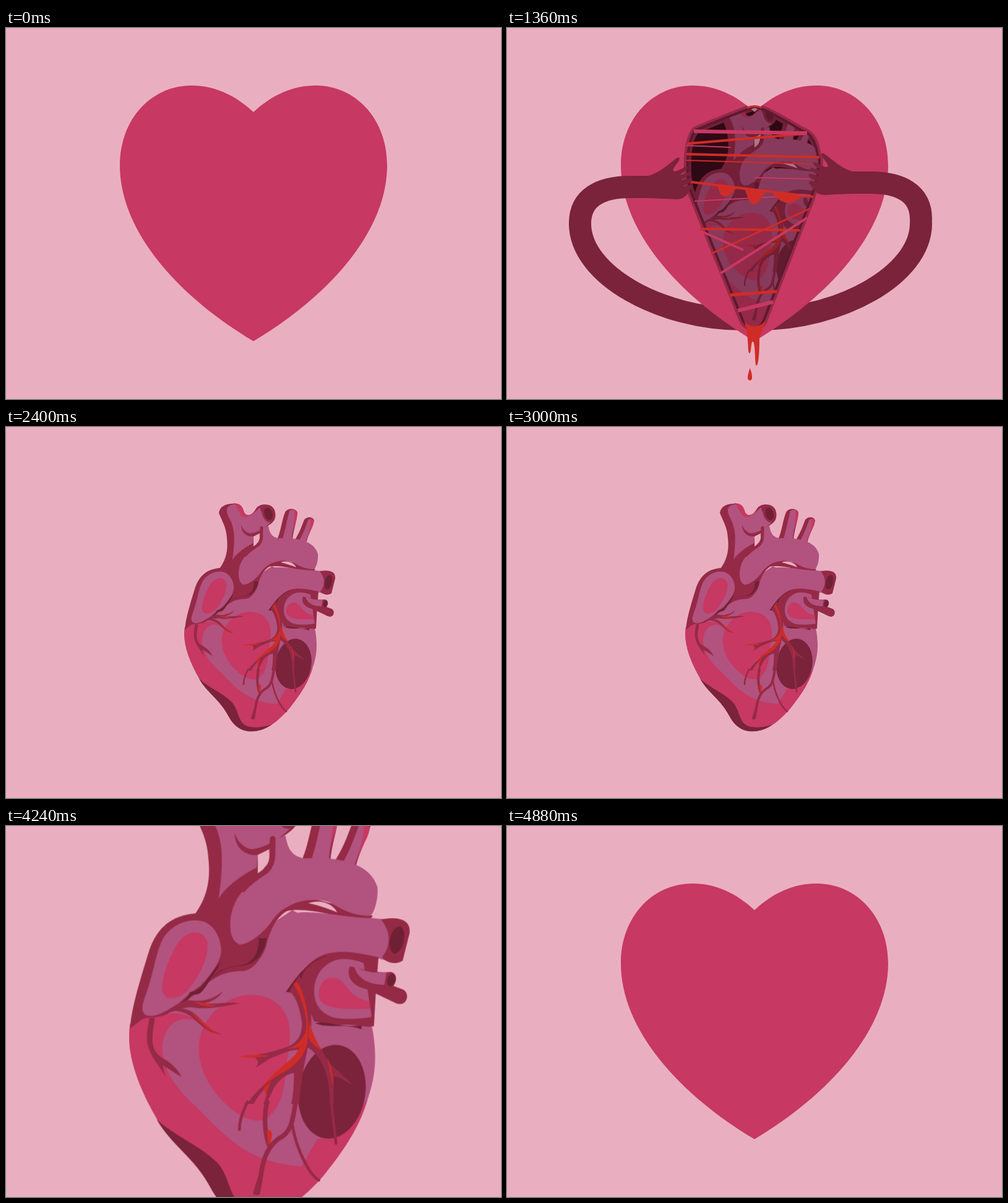
An HTML page for the animation above (4920 ms loop, 800 by 600 pixels).

```html
<!DOCTYPE html>
<html lang="en">
<head>
<meta charset="utf-8">
<title>Heart</title>
<style>
  html, body { margin: 0; width: 100%; height: 100%; overflow: hidden; background: #e9afc0; }
  svg { display: block; width: 800px; height: 600px; }
  .pale { fill: #e9afc0; }
  .crimson { fill: #c73862; }
  .mauve { fill: #b2527e; }
  .rose { fill: #952a47; }
  .maroon { fill: #7a233b; }
  .deep { fill: #6f2034; }
  .red { fill: #d02c27; }
  .limb { fill: none; stroke: #7a233b; stroke-width: 36; stroke-linecap: round; }
  .reach { stroke-dasharray: 1 3; }
  .vein { fill: none; stroke: #952a47; stroke-linecap: round; }
  .rim { fill: none; vector-effect: non-scaling-stroke; }
  .strands line { stroke-width: 4; }
  .tear, .grow { transform-origin: 400px 300px; }
  .hand { transform-origin: 238px 257px; }
  .blood { transform-origin: 400px 474px; }
  .zoom { transform-origin: 392px 328.7px; }
  .beat { transform-origin: 400px 287px; }
</style>
</head>
<body>
<svg viewBox="0 0 800 600">
  <defs>
    <path id="heart" d="M400 136C370 108 336 93 300 93C234 93 184 148 184 222C184 330 280 435 400 506.5C520 435 616 330 616 222C616 148 566 93 500 93C464 93 430 108 400 136Z"/>
    <clipPath id="inHeart"><use href="#heart"/></clipPath>
    <clipPath id="inTear"><path class="tear gap"/></clipPath>
  </defs>

  <g class="shell">
    <g class="armBack">
      <path class="limb reach lower" pathLength="1"/>
    </g>
    <use href="#heart" class="crimson"/>
    <g clip-path="url(#inHeart)">
      <g class="hollow"><path class="tear gap"/></g>
      <g class="fade"><path class="tear gap rim" stroke="#942a48" stroke-width="12"/></g>
    </g>
  </g>

  <g clip-path="url(#inTear)">
    <g class="zoom"><g class="beat">
      <!-- upper vessels -->
      <path class="rose" d="M344 139C345 129 355 124 366 124C376 122 382 128 384 138C390 146 398 143 404 132C408 126 416 124 424 126C434 128 438 140 434 150C428 160 416 162 411 170L404 200L380 250L340 235C352 222 360 205 357 180C356 162 349 152 344 139Z"/>
      <path class="mauve" d="M357 133C358 128 366 124 372 125C378 126 380 136 386 142C394 145 404 137 410 130C414 142 420 150 428 154C420 163 404 172 394 172C386 170 382 164 380 158C380 172 390 178 400 177L399 188C385 195 372 205 366 215C368 200 371 175 366 160C364 150 356 143 357 133Z"/>
      <path class="crimson" d="M370 125C378 122 383 130 385 138C390 146 396 143 400 138C394 148 384 147 379 141Z"/>
      <ellipse class="rose" cx="424" cy="140" rx="10" ry="14.500" transform="rotate(-18 424 140)"/>
      <ellipse class="deep" cx="424" cy="140.500" rx="6.500" ry="10.500" transform="rotate(-18 424 140)"/>
      <path class="rose" d="M439 180C445 165 446 150 451 138C455 130 470 131 471 139C470 152 464 168 463 183Z"/>
      <path class="mauve" d="M447 180C452 165 454 150 458 136C462 132 470 133 470 140C468 155 462 168 462 181Z"/>
      <path class="crimson" d="M466 135C472 135 471 142 469 151L463 170C465 155 467 147 466 135Z"/>
      <path class="rose" d="M466 184C475 170 478 160 482 150C487 144 497 145 498 152C495 164 487 176 485 189Z"/>
      <path class="mauve" d="M473 185C480 174 484 162 488 151C492 147 497 148 497 154C494 166 487 175 484 187Z"/>
      <path class="crimson" d="M492 149C499 149 498 156 494 164L486 180C490 168 493 160 492 149Z"/>

      <!-- body -->
      <path class="mauve" d="M289 324C285 348 295 377 313 408C325 430 345 440 360 468C370 488 385 492 400 492C425 490 445 470 458 455C478 430 490 410 496 388C504 365 503 345 499 325L500 262L430 225L385 255L340 280L310 314Z"/>
      <path class="crimson" d="M289 324C298 318 320 314 331 315C342 316 348 322 353 326C347 320 338 318 331 321C322 324 316 336 317 348C318 365 330 381 343 393C365 413 385 445 438 448L452 424C470 425 485 405 495 390C490 410 478 430 458 455C445 470 425 490 400 492C385 492 370 488 360 468C345 440 325 430 313 408C295 377 285 348 289 324Z"/>
      <g transform="translate(297.8 249.500) scale(.2404)">
        <path class="crimson" d="M400 205C490 205 541 265 541 345C541 400 530 440 525 480C525 560 490 665 420 660C375 655 340 630 310 600C250 545 212 470 212 400C212 290 310 205 400 205Z"/>
      </g>
      <ellipse class="maroon" cx="464.500" cy="383" rx="29" ry="41" transform="rotate(9 464 383)"/>
      <path class="maroon" d="M312 407C325 420 350 430 365 445C378 460 374 482 395 485C410 487 420 484 430 481C415 492 400 493 390 492C375 490 365 478 358 465C345 440 325 430 312 407Z"/>

      <!-- pulmonary trunk and aorta -->
      <path class="rose" d="M340 237L405 192L420 215C445 210 470 222 500 230L495 237C470 230 440 222 425 226C410 236 411 250 405 262C398 275 392 277 388 278C375 278 367 281 360 286L340 300Z"/>
      <path class="mauve" d="M407 262C408 245 415 232 430 228C450 224 475 232 500 232L518 234L512 269C490 262 460 262 446 276L425 296L395 280Z"/>
      <path class="mauve" d="M376 238C376 215 392 200 410 190C417 182 411 170 416 163L424 160C426 172 430 178 440 180C470 178 498 184 504 205C505 216 501 228 498 230C480 230 470 222 462 218C440 212 420 222 412 235C404 246 392 255 384 255C378 252 376 246 376 238Z"/>
      <path class="vein" stroke-width="5" d="M413 163C412 175 415 183 407 191C398 197 392 201 387 207"/>
      <path class="pale" d="M400 177L410 172C409 184 408 188 400 193ZM444 219C455 215 466 220 469 227C462 224 453 221 444 219Z"/>
      <path class="rose" d="M507 233C526 230 533 235 532 245L526 269C520 273 512 271 508 266C516 256 516 244 507 233Z"/>
      <ellipse class="deep" cx="521" cy="251" rx="6" ry="12" transform="rotate(12 521 251)"/>

      <!-- left auricle -->
      <path class="rose" d="M289 328C290 310 298 285 305 262C312 240 325 230 345 228C365 230 376 262 367 274L352 292C345 300 335 305 325 313C315 321 305 316 298 321Z"/>
      <path class="mauve" d="M318 249C325 238 340 231 353 235C364 239 369 253 368 262C366 275 356 284 350 291C342 296 336 302 330 307C320 313 310 320 302 316C296 311 303 300 306 288C310 275 312 260 318 249Z"/>
      <path class="crimson" d="M317 294C316 285 324 262 332 252C340 242 352 242 356 252C358 265 350 282 338 296C330 303 318 305 317 294Z"/>

      <!-- right auricle -->
      <path class="rose" d="M425 296C436 285 442 268 460 263C475 259 490 263 505 266L503 290L501 326C490 328 480 322 468 326C460 326 455 322 449 322L440 300Z"/>
      <path class="mauve" d="M449 296C449 278 462 267 476 267.500C485 268 488 270 492 271L499 318C488 320 478 320 468 319C456 316 449 308 449 296Z"/>
      <path class="crimson" d="M453 298C453 288 460 283 466 284C478 285 478 303 497 304L498 311C480 311 453 313 453 298Z"/>
      <path class="rose" d="M480 274C476 285 485 292 495 294L520 306C530 310 533 297 526 294L518 291C523 284 519 278 514 279C502 280 490 276 480 274Z"/>
      <path class="mauve" d="M484 274C498 281 504 279 512 279L510 290C500 290 487 287 484 274Z"/>
      <ellipse class="deep" cx="516" cy="286" rx="3.500" ry="5.500" transform="rotate(15 516 286)"/>

      <!-- lower vessels -->
      <path class="vein" stroke-width="2.500" d="M391 392C386 402 384 410 384 416M464 393L468 428M430 412C434 435 445 455 453 460"/>
      <path class="vein" stroke-width="4" d="M408 392C404 410 408 425 410 430M433 392C430 408 430 418 418 424C402 436 404 455 400 471M402 458L398 471"/>
      <path class="red" d="M408 417C413 414 414 424 409 430Z"/>

      <g transform="translate(297.8 249.500) scale(.2404)">
        <path class="deep" d="M258 150C290 100 340 105 384 93C420 70 430 40 428 0L457 0C450 50 425 85 384 97C340 104 300 100 258 150Z"/>
        <path class="deep" d="M90 270C150 240 165 225 180 195C230 190 240 140 290 85L280 110C250 150 235 185 215 200C190 210 185 200 175 220C150 240 130 265 90 270Z"/>
        <path class="deep" d="M526 195C560 150 600 80 680 62C620 85 590 110 585 140L548 195ZM632 308C680 295 710 325 800 316L800 330C740 305 690 330 632 308Z"/>
        <path class="rose" d="M90 270C140 245 160 220 180 225C220 230 260 225 298 192C280 225 240 234 232 236C280 240 320 228 358 236C310 245 240 260 190 250C160 246 125 268 90 270Z"/>
        <path class="rose" d="M125 262C160 245 190 265 210 285C235 310 255 335 292 347C250 345 225 320 200 298C180 275 150 265 125 262Z"/>
        <path class="rose" d="M32 288L53 288C45 340 30 400 75 430C110 450 135 470 150 503C120 485 100 470 80 460L92 503C70 460 25 420 24 360C24 330 32 310 32 288Z"/>
        <path class="rose" d="M540 190L575 135C615 210 625 280 615 350C600 430 585 480 575 600L546 600C556 560 555 520 556 488C530 488 490 520 475 560L455 600L387 600C420 550 450 530 470 515C520 480 560 450 575 405C540 400 500 425 470 435L415 470C430 455 430 445 415 432L365 428C430 425 480 410 520 398C560 385 585 360 585 310C580 260 565 215 540 190Z"/>
        <path class="crimson" d="M450 545C430 565 415 590 410 600L445 600C460 570 458 550 450 545Z"/>
        <path class="rose" d="M612 320C620 370 650 390 665 420C690 470 735 490 770 533C740 515 715 500 702 500C698 540 700 580 700 600L685 600C687 540 675 480 650 440C635 415 615 400 600 392Z"/>
        <path class="red" d="M555 165C560 155 570 160 575 170C605 230 612 310 605 370C600 430 550 470 500 495C480 505 465 520 440 540C480 480 560 440 577 395L520 403C560 395 590 370 600 330C605 270 580 210 555 165Z"/>
        <path class="red" d="M360 429C390 420 430 420 468 425C440 432 390 432 360 429ZM612 300C620 340 640 380 658 405C640 400 620 380 608 360ZM676 430C690 460 700 500 696 535C690 500 685 470 676 430ZM445 542L472 520C465 540 455 555 458 572Z"/>
        <path class="red" d="M195 230C220 232 250 240 276 244C250 252 220 245 195 230ZM183 266C210 285 240 320 284 346C250 340 210 300 183 266Z"/>
      </g>
    </g></g>
    <rect class="shade" width="800" height="600" fill="#2e0a16"/>
  </g>

  <g class="fade">
    <path class="tear gap rim" stroke="#5e1830" stroke-width="4"/>
    <g class="strands tear" stroke="#d02c27">
      <line x1="292" y1="187" x2="480" y2="171"/>
      <line x1="290" y1="204" x2="505" y2="209"/>
      <line x1="290" y1="214" x2="495" y2="220" style="stroke-width:2"/>
      <line x1="297" y1="249" x2="495" y2="273"/>
      <line x1="312" y1="325" x2="473" y2="327"/>
      <line x1="330" y1="365" x2="490" y2="292" style="stroke-width:3"/>
      <line x1="360" y1="432" x2="436" y2="426" style="stroke-width:5"/>
      <path d="M388 129Q400 124 412 129" fill="none" stroke-width="3"/>
      <g stroke="#c73862">
        <line x1="302" y1="167" x2="485" y2="170" style="stroke-width:6"/>
        <line x1="290" y1="190" x2="362" y2="193" style="stroke-width:2"/>
        <line x1="400" y1="242" x2="490" y2="244" style="stroke-width:2"/>
        <line x1="303" y1="280" x2="490" y2="270" style="stroke-width:2"/>
        <line x1="312" y1="328" x2="382" y2="359"/>
        <line x1="345" y1="397" x2="485" y2="307"/>
        <line x1="373" y1="457" x2="430" y2="443" style="stroke-width:6"/>
      </g>
      <path class="red" stroke="none" d="M335 253C345 254 340 272 352 272C366 272 362 262 372 260L385 262C388 270 392 285 400 285C410 284 410 272 418 266L430 267C435 275 445 283 455 283C465 282 470 276 480 272Z"/>
    </g>
    <path class="blood red" d="M383 472C390 486 408 486 419 472C414 490 408 495 408 505C408 520 407 546 403 546C400 546 402 507 397 507C394 508 395 526 392 526C388 526 392 500 383 472Z"/>
  </g>
  <path class="drop red" d="M392.500 550C396 558 396 562 396 566C396 571 389 571 389 566C389 562 390 558 392.500 550Z"/>

  <g class="armFront">
    <path class="limb upper"/>
    <path class="hand maroon" d="M225 240C245 236 258 222 272 212C278 207 281 210 277 216C271 224 266 230 270 232C276 232 284 226 290 224C293 224 293 227 290 229L279 238L295 233C298 233 298 237 295 238L281 246L297 243C300 244 300 248 297 249L284 256L297 254C300 256 299 259 296 261C292 270 285 278 272 277C255 276 240 275 225 275Z"/>
  </g>

  <use href="#heart" class="grow pale outer"/>
  <use href="#heart" class="grow crimson inner"/>
</svg>
<script>
  const LOOP = 4920;
  const sheet = document.createElement('style');
  let count = 0;

  // Turns [ms, value] pairs into a looping keyframe rule.
  function animate(selector, property, frames) {
    const name = 'k' + count++;
    const all = [[0, frames[0][1]], ...frames, [LOOP, frames.at(-1)[1]]];
    const body = all.map(([ms, v]) => `${(ms / LOOP * 100).toFixed(4)}%{${property}:${v}}`).join('');
    sheet.textContent += `@keyframes ${name}{${body}}${selector}{animation:${name} ${LOOP}ms linear infinite}`;
  }

  const gap = 'M400 127C380 135 340 150 305 165C288 185 290 240 296 262L380 470C388 490 410 490 416 470L490 280C500 250 510 215 502 205C498 180 490 170 475 165C450 150 420 132 400 127Z';
  document.querySelectorAll('.gap').forEach(p => p.setAttribute('d', gap));

  // The right arm mirrors the left one.
  for (const [name, dy] of [['armBack', 0], ['armFront', -7]]) {
    const arm = document.querySelector('.' + name);
    const twin = arm.cloneNode(true);
    twin.setAttribute('transform', `translate(787 ${dy}) scale(-1 1)`);
    arm.after(twin);
  }

  const lower = x => `path("M380 471C250 471 ${x} 400 ${x} 316")`;
  const upper = (x, wrist) => `path("M${x} 316C${x} 275 ${x + 32} 257 ${wrist - 40} 257L${wrist} 257")`;
  const folded = x => `path("M${x} 316C${x} 316 ${x} 316 ${x} 316L${x} 316")`;
  const hand = (x, y, s) => `translate(${x}px,${y}px) scale(${s})`;
  const heart = (y, s) => `translate(0,${y}px) scale(${s})`;

  animate('.lower', 'd', [[480, lower(72)], [600, lower(72)], [840, lower(110)], [880, lower(110)],
    [1360, lower(118)], [1440, lower(118)], [1560, lower(77)]]);
  animate('.armBack', 'stroke-dashoffset', [[320, 1], [480, 0], [1640, 0], [1760, 1]]);
  animate('.upper', 'd', [[480, folded(72)], [640, upper(72, 190)], [840, upper(110, 343)], [880, upper(110, 343)],
    [1120, upper(114, 270)], [1360, upper(118, 240)], [1440, upper(118, 240)], [1560, upper(77, 180)], [1660, folded(77)]]);
  animate('.hand', 'transform', [[480, hand(-166, 59, 0)], [640, hand(-48, 0, 1)], [840, hand(105, 0, 1)], [880, hand(105, 0, 1)],
    [1120, hand(32, 0, 1)], [1360, hand(0, 0, 1)], [1440, hand(0, 0, 1)], [1560, hand(-58, 0, 1)], [1660, hand(-161, 59, 0)]]);
  animate('.armFront', 'visibility', [[479, 'hidden'], [480, 'visible'], [1659, 'visible'], [1660, 'hidden']]);
  animate('.shell', 'visibility', [[1759, 'visible'], [1760, 'hidden'], [4919, 'hidden']]);

  // Once the shell is gone the opening outgrows the stage.
  animate('.tear', 'transform', [[880, 'scale(0,1)'], [1120, 'scale(.7,1)'], [1360, 'scale(1,1)'], [1440, 'scale(1,1)'],
    [1600, 'scale(3.2,1.5)'], [1601, 'scale(40,40)'], [4650, 'scale(40,40)'], [4651, 'scale(0,1)']]);
  animate('.hollow', 'fill', [[1440, '#2e0a16'], [1560, '#e9afc0']]);
  animate('.shade', 'opacity', [[1440, .33], [1560, 0]]);
  animate('.fade', 'opacity', [[879, 0], [880, 1], [1440, 1], [1560, 0]]);
  animate('.blood', 'transform', [[1040, 'scale(0)'], [1200, 'scale(1,.5)'], [1360, 'scale(1)'], [1440, 'scale(1)'], [1560, 'scale(1,1.5)']]);
  animate('.drop', 'transform', [[1239, 'translate(0,100px)'], [1240, 'translate(0,-30px)'], [1360, 'translate(0,0)'],
    [1400, 'translate(0,4px)'], [1440, 'translate(0,12px)'], [1560, 'translate(0,60px)']]);

  const beats = [2200, 2800, 3400].flatMap(ms => [[ms, 'scale(1)'], [ms + 100, 'scale(1.11)'], [ms + 200, 'scale(1)']]);
  animate('.beat', 'transform', beats);
  animate('.zoom', 'transform', [[4080, 'scale(1)'], [4200, 'scale(1.5)'], [4280, 'scale(2.2)'], [4400, 'scale(4.16)'],
    [4520, 'scale(7)'], [4640, 'scale(11)']]);
  animate('.outer', 'transform', [[4320, heart(10, 0)], [4400, heart(6, .348)], [4480, heart(4, .9)], [4560, heart(0, 2)], [4640, heart(0, 3.4)]]);
  animate('.inner', 'transform', [[4340, heart(34, 0)], [4400, heart(27, .231)], [4520, heart(16, .55)],
    [4640, heart(5, .86)], [4760, heart(1, .97)], [4880, heart(0, 1)]]);
  document.head.append(sheet);
</script>
</body>
</html>
```
